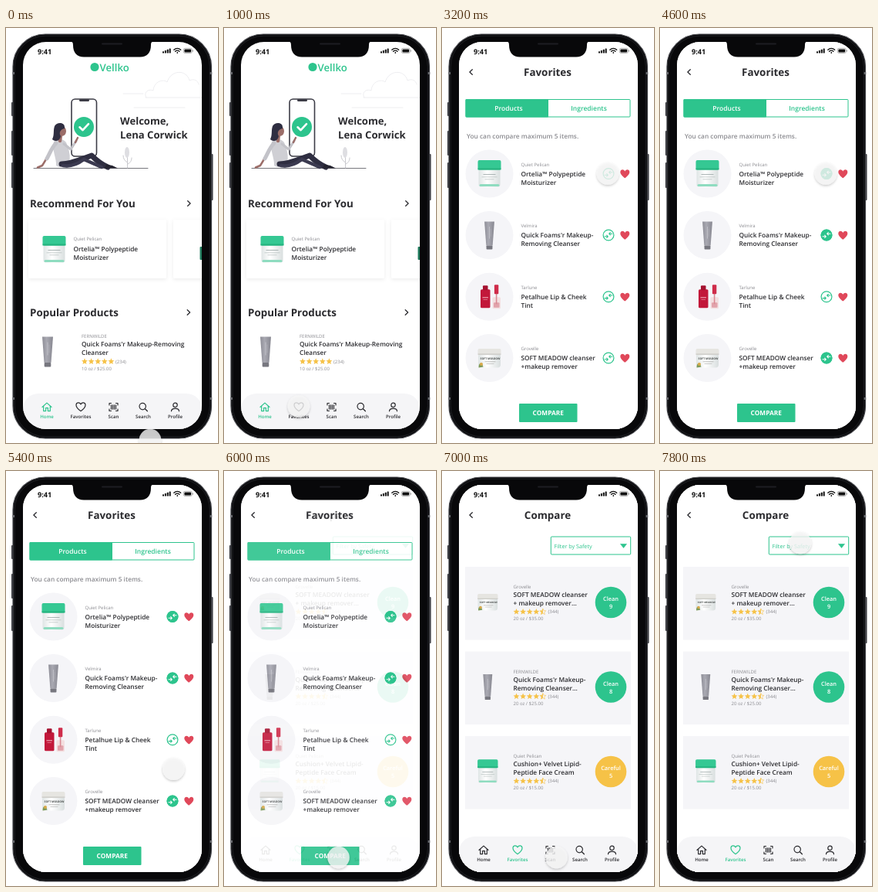
An HTML page for the animation above (8000 ms loop, 275 by 537 pixels).

```html
<!DOCTYPE html>
<html lang="en">
<head>
<meta charset="utf-8">
<title>Skincare app</title>
<style>
html, body { margin: 0; width: 100%; height: 100%; overflow: hidden; background: #fff; }
svg { display: block; width: 100vw; height: 100vh; }
text { font-family: 'Open Sans', 'Noto Sans', sans-serif; text-rendering: geometricPrecision; }
</style>
</head>
<body>
<svg id="stage" viewBox="0 0 275 537"></svg>
<script>
const GREEN = '#2dc48d', INK = '#2b2b2f', GREY = '#8b8b90', PALE = '#f5f5f8', GOLD = '#f6c247', RED = '#e0485a';
const LOOP = 8000;

// ---- drawing helpers ----
const rect = (x, y, w, h, fill, r = 0, more = '') =>
  `<rect x="${x}" y="${y}" width="${w}" height="${h}" rx="${r}" fill="${fill}" ${more}/>`;
const circle = (x, y, r, fill, more = '') => `<circle cx="${x}" cy="${y}" r="${r}" fill="${fill}" ${more}/>`;
const shape = (d, fill, more = '') => `<path d="${d}" fill="${fill}" ${more}/>`;
const line = (d, color, w = 1) =>
  `<path d="${d}" fill="none" stroke="${color}" stroke-width="${w}" stroke-linecap="round" stroke-linejoin="round"/>`;
const text = (x, y, str, size, color = INK, weight = 400, anchor = 'start') =>
  `<text x="${x}" y="${y}" font-size="${size}" fill="${color}" font-weight="${weight}" text-anchor="${anchor}">${str}</text>`;
const at = (x, y, body, s = 1) => `<g transform="translate(${x} ${y}) scale(${s})">${body}</g>`;
const heading = (x, y, str, anchor) => text(x, y, str, 13.4, INK, 700, anchor);
const small = (x, y, str) => text(x, y, str, 6, GREY);
const title = (x, y, lines) => lines.map((s, i) => text(x, y + i * 11, s, 8.3, INK, 600)).join('');

// ---- small icons ----
const HEART = 'M0 5.2C-3 3-6-.2-6-2.6C-6-6.2-1.6-6.7 0-3.6C1.6-6.7 6-6.2 6-2.6C6-.2 3 3 0 5.2Z';
const ARROWS = 'M-5 1.8H-.8M-2.3 .2L-.7 1.8L-2.3 3.4M5-1.8H.8M2.3-3.4L.7-1.8L2.3-.2';
const STAR = 'M' + Array.from({ length: 10 }, (_, i) => {
  const r = i % 2 ? 1.9 : 4.2, a = i * Math.PI / 5;
  return `${(r * Math.sin(a)).toFixed(2)} ${(-r * Math.cos(a)).toFixed(2)}`;
}).join('L') + 'Z';

const stars = (x, y, half) => Array.from({ length: 5 }, (_, i) => at(x + 4 + i * 8.6, y,
  half && i === 4
    ? shape(STAR, 'none', `stroke="${GOLD}" stroke-width=".6"`) + shape(STAR, GOLD, 'clip-path="url(#left)"')
    : shape(STAR, GOLD))).join('');

const chevron = (x, y, dir) => line(`M${x - 1.8 * dir} ${y - 3.3}L${x + 1.6 * dir} ${y}L${x - 1.8 * dir} ${y + 3.3}`, INK, 1.3);

const tabIcons = [
  ['Home', c => line('M-6 0L0-5.4L6 0M-4.3-1V5.2H-1.4V1.2H1.4V5.2H4.3V-1', c, 1.2)],
  ['Favorites', c => line(HEART, c, 1.2)],
  ['Scan', c => line('M-5.5-2.5V-5H-3M3-5H5.5V-2.5M5.5 2.5V5H3M-3 5H-5.5V2.5M-3-2.7V2.7M-1-2.7V2.7M1-2.7V2.7M3-2.7V2.7', c, 1.2)],
  ['Search', c => `<circle cx="-.8" cy="-.9" r="4.2" fill="none" stroke="${c}" stroke-width="1.2"/>` + line('M2.4 2.2L5.4 5.2', c, 1.3)],
  ['Profile', c => `<circle cy="-2.6" r="2.7" fill="none" stroke="${c}" stroke-width="1.2"/>` + line('M-5 5.3C-5 .6 5 .6 5 5.3', c, 1.2)]
];
const tabBar = (active, dx) => rect(22, 473, 232, 70, '#f5f5f7', 20) +
  tabIcons.map(([name, icon], i) => {
    const x = [53, 97, 139.5, 178, 219.5][i] + dx, c = name === active ? GREEN : INK;
    return at(x, 490.5, icon(c)) + text(x, 505, name, 6.1, c, 600, 'middle');
  }).join('');

// ---- products ----
const jar = rect(-14, -8, 28, 24.5, 'url(#jarBody)', 3) + rect(-15, -18, 30, 12.5, '#35c893', 2) +
  rect(-15, -7.5, 30, 2, '#24b37e') + rect(-8, 0, 16, .8, '#9aa6a5') + rect(-10, 3.5, 20, .7, '#b7c0bf') +
  rect(-6, 6.5, 12, .7, '#b7c0bf') + rect(-13, 13, 26, 3, '#8fdcc0', 1.5);
const tube = shape('M-7-19.5L7-19.5L4.5 14H-4.5Z', 'url(#tubeBody)') + rect(-4.3, 14, 8.6, 5.5, '#77777f', 1) +
  line('M0-12V4', '#c5c5cc', .9) + line('M2-9V1', '#b8b8c0', .5);
const lip = rect(-11.5, -10, 12.5, 24, '#c2183a', 1.5) + rect(-8.5, -15, 6.5, 6, '#a51230', 1) +
  rect(-9, 0, 7.5, 1, '#f3b7c2') + rect(-8, 3, 5.5, .7, '#e58b9d') +
  rect(4, 0, 10.5, 15, '#f3dfe0', 1.5) + rect(5.5, 7, 7.5, 6.5, '#e2a3ab', 1) +
  rect(8.3, -5, 1.6, 14, '#d98a94') + rect(6.4, -16, 5.4, 12, '#cf2c4a', 1);
const tub = rect(-14.5, -7, 29, 19, 'url(#jarBody)', 4) + rect(-15, -12.5, 30, 8, '#e6e5e1', 2) +
  rect(-15, -6, 30, 1.2, '#c9c8c3') + shape('M-14 12C-14 5-10 4-8 11Z', '#7d9a5b') + circle(-10.5, 7.5, 2, '#d8a94a') +
  text(1, 1.7, 'SOFT MEADOW', 3.5, '#4d5150', 700, 'middle') + rect(-6, 4, 14, .7, '#a8a8a6') + rect(-4, 6.5, 10, .7, '#b8b8b6');

// ---- pages ----
const cloud = line('M181 90H254M152 85H178M166 103H232M182 90C178 84 184 78 191 81C192 68 205 66 209 70C214 54 234 53 238 68C244 65 249 68 250 73', '#ededf0', 1);

const girl =
  line('M36 181.5H184', '#55555c', .8) +
  line('M157.5 181V166M157.5 174C154 172 152 169 152 165M158 176C162 174 163 171 163 168', '#c9c9ce', 1) +
  `<ellipse cx="157" cy="161" rx="3" ry="7" fill="#dedee2"/>` +
  rect(85, 92, 32.5, 74, '#fff', 4.5, 'stroke="#3c3c46" stroke-width="1.6"') + rect(95, 92, 13, 3, '#3c3c46', 1.5) +
  circle(101, 128, 13, GREEN) + line('M95.5 128.3L99.6 132.2L107 124.2', '#fff', 2.6) +
  line('M64 151C57 160 53 169 47 178L41 180.5', '#9b6d68', 2.6) +
  shape('M62 147C67 143 74 143 78 148C82 157 84 166 82 175C77 181 69 181 65 178C66 169 59 158 62 147Z', '#cfcfd4') +
  line('M65 149C59 155 57 162 53 169', '#c3c3c9', 5) +
  line('M75 150L84 157L91 146', '#c3c3c9', 3.2) + line('M90 148L93 142', '#9b6d68', 2.4) +
  line('M72 176C86 176 99 169 111 165C117 171 125 177 132 180', '#2f2e41', 7) +
  line('M74 178C85 180 93 176 101 170L124 180', '#3b3a50', 4.5) +
  shape('M130 176.5L138 178L145 181.5H128Z', '#24232f') +
  line('M71 138L70 146', '#9b6d68', 4.5) +
  `<ellipse cx="73" cy="133.5" rx="5" ry="6.2" fill="#9b6d68"/>` +
  shape('M76 128C76 122 66 121 63 127C61 133 63 138 60 144C64 148 70 146 71 140C68 135 71 131 76 130Z', '#2f2e41');

const home = rect(0, 0, 275, 537, '#fff') + cloud + circle(115, 50.5, 5.6, GREEN) +
  text(121.5, 55.5, 'Vellko', 13.2, GREEN, 600) + girl +
  text(148, 125, 'Welcome,', 13.1, INK, 700) + text(148, 143, 'Lena Corwick', 13.1, INK, 700) +
  heading(31, 232, 'Recommend For You') + chevron(237.5, 227, 1) +
  rect(29, 248, 179, 76, '#fff', 2, 'filter="url(#card)"') + rect(217, 248, 60, 76, '#fff', 2, 'filter="url(#card)"') +
  rect(251.5, 283, 8, 17, '#1f7a5c', 1) +
  at(62.5, 287, jar) + small(87.5, 275, 'Quiet Pelican') + title(87.5, 289, ['Ortelia™ Polypeptide', 'Moisturizer']) +
  heading(31, 373, 'Popular Products') + chevron(237, 368, 1) +
  at(54, 419, tube) + small(98, 401, 'FERNWILDE') + title(98, 412, ["Quick Foams'r Makeup-Removing", 'Cleanser']) +
  stars(98, 431.5) + small(142, 433.5, '(234)') + small(98, 442.5, '10 oz / $25.00') + tabBar('Home', 0);

const pageTop = name => rect(0, 0, 275, 537, '#fff') + chevron(37.5, 57, -1) + heading(137, 62, name, 'middle');

const favRow = ([y, brand, lines, art, s, picked]) =>
  circle(61.5, y, 31, PALE) + at(61.5, y + .5, art, s) + small(102.5, y - 10, brand) + title(102.5, y + 3, lines) +
  at(216, y, `<circle r="6.9" fill="#fff" stroke="${GREEN}" stroke-width="1.2"/>` + line(ARROWS, GREEN, 1.1) +
    (picked ? `<g class="on">${circle(0, 0, 7.5, GREEN)}${line(ARROWS, '#fff', 1.1)}</g>` : '')) +
  at(237.3, y + .5, shape(HEART, RED));

const favorites = pageTop('Favorites') +
  rect(31, 92.5, 213, 22.5, '#fff', 1, `stroke="${GREEN}"`) + rect(30.5, 92, 107.5, 23.5, GREEN, 1) +
  text(86.5, 107, 'Products', 8.5, '#fff', 600, 'middle') + text(190.5, 107, 'Ingredients', 8.5, GREEN, 600, 'middle') +
  text(32, 142.5, 'You can compare maximum 5 items.', 8.3, GREY, 600) +
  [
    [188.5, 'Quiet Pelican', ['Ortelia™ Polypeptide', 'Moisturizer'], jar, 1, 1],
    [268, 'Velmira', ["Quick Foams'r Makeup-", 'Removing Cleanser'], tube, .92, 1],
    [347.8, 'Tarlune', ['Petalhue Lip &amp; Cheek', 'Tint'], lip, 1, 0],
    [427, 'Grovelle', ['SOFT MEADOW cleanser', '+makeup remover'], tub, 1, 1]
  ].map(favRow).join('') +
  rect(100, 486, 75.5, 24, GREEN, 1) + text(137.7, 501, 'COMPARE', 8.3, '#fff', 700, 'middle');

const compareCard = ([brand, lines, price, art, s, label, score, color], i) => at(0, 124 + i * 109.5,
  rect(30, 0, 215, 94.5, PALE) + at(59.3, 46, art, s) + small(92.5, 28, brand) + title(92.5, 39, lines) +
  stars(92.5, 58.2, true) + small(137.5, 60.3, '(344)') + small(92.5, 69, `20 oz / $${price}.00`) +
  circle(219, 46, 20.3, color) + text(219, 44, label, 7.4, '#fff', 600, 'middle') + text(219, 54.3, score, 7.4, '#fff', 600, 'middle'));

const compare = pageTop('Compare') +
  rect(141.3, 85, 103.4, 23, '#fff', 1, `stroke="${GREEN}"`) + text(145.5, 99.5, 'Filter by Safety', 7.2, GREEN, 500) +
  shape('M231.5 94.5H239.5L235.5 99.5Z', GREEN, `stroke="${GREEN}" stroke-width=".6" stroke-linejoin="round"`) +
  [
    ['Grovelle', ['SOFT MEADOW cleanser', '+ makeup remover...'], 35, tub, .88, 'Clean', 9, GREEN],
    ['FERNWILDE', ["Quick Foams'r Makeup-", 'Removing Cleanser...'], 25, tube, .85, 'Clean', 8, GREEN],
    ['Quiet Pelican', ['Cushion+ Velvet Lipid-', 'Peptide Face Cream'], 15, jar, .88, 'Careful', 5, GOLD]
  ].map(compareCard).join('') + tabBar('Favorites', 1);

// ---- device ----
const device = rect(7, 96, 3, 18, '#3a3b40', 1) + rect(7, 133, 3, 32, '#3a3b40', 1) + rect(7, 174, 3, 33, '#3a3b40', 1) +
  rect(265.5, 163, 3, 60, '#3a3b40', 1) +
  rect(9, 8, 257.5, 523, '#08080a', 42, 'stroke="#4a4b50" stroke-width="1.2"') +
  rect(11.2, 10.2, 253.1, 518.6, 'none', 40, 'stroke="#1f2024" stroke-width="1"') +
  [[8.4, 57], [264.6, 57], [8.4, 478], [264.6, 478]].map(([x, y]) => rect(x, y, 2.6, 3, '#6a6b70')).join('');

const statusBar = shape('M82 17C86 17 87 19 87 22C87 32 92 37.5 101 37.5H174C183 37.5 188 32 188 22C188 19 189 17 193 17Z', '#08080a') +
  rect(124, 19.5, 27, 2, '#1d1d22', 1) + text(41, 34, '9:41', 9.2, '#111', 700) +
  [0, 1, 2, 3].map(i => rect(203 + i * 2.9, 30.3 - i * 1.3, 2, 2.2 + i * 1.3, '#111', .5)).join('') +
  line('M217.8 28.3C220.5 25.6 224 25.6 226.7 28.3M219.5 30.3C221.2 28.8 223.3 28.8 225 30.3', '#111', 1.3) + circle(222.3, 32, .9, '#111') +
  rect(230.3, 26.3, 11, 6.2, 'none', 1.8, 'stroke="#999" stroke-width=".7"') + rect(231.4, 27.4, 8.8, 4, '#111', 1) + rect(242, 28.4, 1, 2, '#999', .5);

const stage = document.getElementById('stage');
stage.innerHTML = `<defs>
  <clipPath id="screen"><rect x="22" y="18" width="232" height="501" rx="30"/></clipPath>
  <clipPath id="left"><rect x="-5" y="-5" width="5" height="10"/></clipPath>
  <linearGradient id="jarBody"><stop offset="0" stop-color="#dfe5e5"/><stop offset=".4" stop-color="#fff"/><stop offset="1" stop-color="#d9dfdf"/></linearGradient>
  <linearGradient id="tubeBody"><stop offset="0" stop-color="#8d8d96"/><stop offset=".4" stop-color="#a9a9b2"/><stop offset="1" stop-color="#888891"/></linearGradient>
  <filter id="card" x="-10%" y="-15%" width="120%" height="135%"><feDropShadow dx="0" dy="1.5" stdDeviation="2.5" flood-color="#000" flood-opacity=".08"/></filter>
  <filter id="soft" x="-50%" y="-50%" width="200%" height="200%"><feDropShadow dx="0" dy="1.5" stdDeviation="1.8" flood-color="#000" flood-opacity=".28"/></filter>
</defs>
${device}
<g clip-path="url(#screen)"><g id="home">${home}</g><g id="favorites">${favorites}</g><g id="compare">${compare}</g></g>
${statusBar}
<g id="cursor"><circle r="14.3" fill="#f7f7f7" fill-opacity=".78" filter="url(#soft)"/></g>`;

// ---- motion ----
const byId = id => document.getElementById(id);
const marks = [...document.querySelectorAll('.on')];
const ramp = (t, a, b) => Math.min(1, Math.max(0, (t - a) / (b - a)));
const ease = u => (1 - Math.cos(Math.PI * u)) / 2;

// start, end, from, halfway point, to
const moves = [
  [0, 700, [187, 533], [142, 512], [97, 489.5]],
  [1600, 2400, [97, 489.5], [121.5, 391], [215, 188.5]],
  [5000, 5800, [215, 188.5], [217.5, 385], [148.5, 500]],
  [7000, 7600, [148.5, 500], [168, 297], [182, 93]]
];
function cursorAt(t) {
  const [a, b, p, m, q] = moves.filter(v => v[0] <= t).pop();
  const u = ease(ramp(t, a, b));
  return [0, 1].map(k => {
    const c = 2 * m[k] - (p[k] + q[k]) / 2;
    return (1 - u) ** 2 * p[k] + 2 * u * (1 - u) * c + u * u * q[k];
  });
}

function draw(t) {
  byId('favorites').setAttribute('opacity', ease(ramp(t, 1150, 1450)));
  byId('compare').setAttribute('opacity', ease(ramp(t, 5950, 6200)));
  marks.forEach(m => m.setAttribute('opacity', ease(ramp(t, 3850, 4150))));
  byId('cursor').setAttribute('transform', `translate(${cursorAt(t)})`);
}

const start = performance.now();
function tick() {
  draw((performance.now() - start) % LOOP);
  requestAnimationFrame(tick);
}
tick();
</script>
</body>
</html>
```
